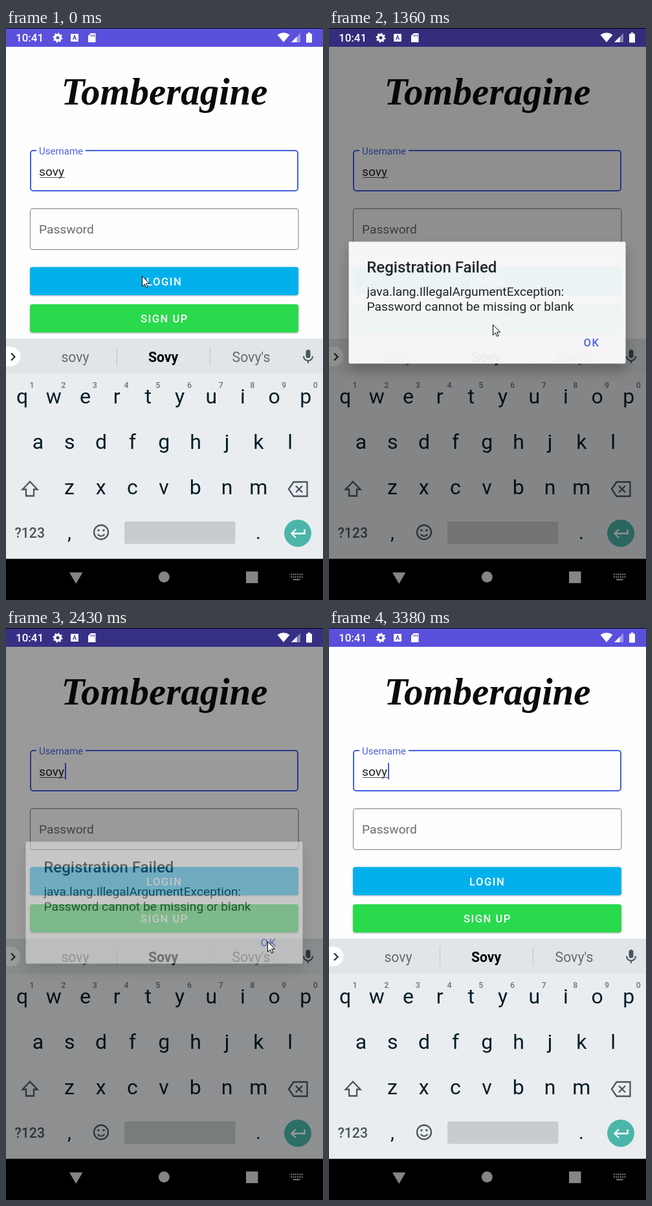
Recreate the animation shown at these times as an HTML page. Size 490 by 882 pixels, loop 3750 ms.

```html
<!DOCTYPE html>
<html lang="en">
<head>
<meta charset="utf-8">
<title>Sign-up error dialog</title>
<style>
  html, body { margin: 0; width: 100%; height: 100%; overflow: hidden; background: #000; }
  svg { display: block; font-family: Roboto, sans-serif; font-size: 19.2px; }
  .mid { text-anchor: middle; }
  .medium { font-weight: 500; }
  .caps { font-weight: 500; font-size: 16.6px; letter-spacing: 1.5px; }
  .key { font-size: 32px; fill: #031e28; text-anchor: middle; }
  .digit { font-size: 12.5px; font-weight: 500; fill: #6b7479; text-anchor: middle; }
  .hint { font-size: 21.2px; text-anchor: middle; fill: #636b70; }
  .line { fill: none; stroke: #48575e; stroke-width: 2.3; }
  .button { filter: drop-shadow(0 1.5px 1px rgba(0,0,0,.32)); }
  .panel { fill: #fff; filter: drop-shadow(0 10px 10px rgba(0,0,0,.26)); }
</style>
</head>
<body>
<svg width="490" height="882" viewBox="0 0 490 882">
  <defs>
    <clipPath id="signUpClip"><rect x="37" y="426" width="415" height="43.5" rx="4"/></clipPath>
  </defs>

  <!-- Page -->
  <rect y="1" width="490" height="818" fill="#fefefe"/>
  <rect y="1" width="490" height="28" fill="#5a50dc"/>

  <text class="mid" x="245" y="118" fill="#0a0a0a"
    style="font:italic 700 59px 'Liberation Serif',serif">Tomberagine</text>

  <rect x="38" y="189" width="413" height="62" rx="4" fill="none" stroke="#4260e2" stroke-width="2"/>
  <path d="M47 189H123" stroke="#fefefe" stroke-width="4"/>
  <text x="51" y="195" font-size="15" fill="#4a62e0">Username</text>
  <text x="51" y="228" fill="#202020">sovy</text>
  <path d="M52 230.500H91" stroke="#555"/>
  <rect id="caret" x="91" y="208" width="2" height="25.500" fill="#4260e2"/>

  <rect x="37.500" y="278.700" width="414.500" height="63" rx="4" fill="none" stroke="#8e8e8e" stroke-width="1.200"/>
  <text x="51" y="317" fill="#6b6b6b">Password</text>

  <rect class="button" x="37" y="368.500" width="415" height="43.500" rx="4" fill="#02b1ec"/>
  <rect class="button" id="signUp" x="37" y="426" width="415" height="43.500" rx="4" fill="#29da4d"/>
  <circle id="ripple" cx="253" cy="457" fill="#fff" fill-opacity=".235" clip-path="url(#signUpClip)"/>
  <g class="caps" fill="#fff">
    <text x="217" y="397">LOGIN</text>
    <text x="208" y="454">SIGN UP</text>
  </g>

  <!-- Keyboard -->
  <rect y="479" width="490" height="340" fill="#eaedf0"/>
  <rect y="479" width="490" height="54" fill="#e1e5e8"/>
  <rect x="-20" y="491.500" width="42.500" height="30" rx="15" fill="#fff"/>
  <path d="M8 501.500L13.500 507L8 512.500" fill="none" stroke="#2a3439" stroke-width="2.200"/>
  <text class="hint" x="107" y="515">sovy</text>
  <text class="hint" x="243" y="515" style="font-weight:700;fill:#000">Sovy</text>
  <text class="hint" x="379" y="515">Sovy's</text>
  <path d="M171.500 492V521M315.500 492V521" stroke="#c0c5c8"/>
  <rect x="463.500" y="496" width="7" height="13" rx="3.500" fill="#48575e"/>
  <path d="M460 506a7 7 0 0 0 14 0M467 513v4" class="line" style="stroke-width:2"/>
  <g id="keys"></g>

  <path class="line" d="M37 699.500L25.500 711.500H31V721.500H43V711.500H48.500z"/>
  <path class="line" d="M437 711L444.500 700H465.500V722H444.500zM448 706l10 10M458 706l-10 10"/>
  <text class="medium" x="13.500" y="786" font-size="21.200" fill="#46555b">?123</text>
  <text class="key" x="98" y="788" style="font-size:30px">,</text>
  <text class="key" x="390" y="788" style="font-size:30px">.</text>
  <circle class="line" cx="147" cy="777.500" r="11"/>
  <path class="line" d="M141.500 780.500Q147 786.500 152.500 780.500" style="stroke-width:2"/>
  <g fill="#48575e">
    <circle cx="143" cy="774.500" r="1.700"/>
    <circle cx="151" cy="774.500" r="1.700"/>
  </g>
  <rect x="183" y="761" width="171.500" height="34.500" rx="3" fill="#c8cccf"/>
  <circle cx="451" cy="779" r="21" fill="#4bb5a9"/>
  <path d="M461.500 773V779.500H442M448 773L441.500 779.500L448 786" fill="none" stroke="#fff" stroke-width="2.300"/>

  <!-- The dim layer leaves the status icons bright -->
  <rect id="dim" y="1" width="490" height="818"/>
  <g fill="#fff">
    <text class="medium" x="15" y="21.3" font-size="17">10:41</text>
    <g fill="none" stroke="#fff">
      <circle cx="80" cy="15" r="4.2" stroke-width="3.4"/>
      <circle cx="80" cy="15" r="6.3" stroke-width="2.4" pathLength="16" stroke-dasharray="1"/>
    </g>
    <rect x="100" y="9" width="12" height="12" rx="1"/>
    <text class="mid" x="106" y="18.3" font-size="9" font-weight="700" fill="#4038a0">A</text>
    <path d="M131 8H138.500V22H127V12z"/>
    <path d="M131.500 10v3.500M134 10v3.500M136.500 10v3.500" stroke="#4038a0"/>
    <path d="M429 22L419.500 10.500Q429 4 438.500 10.500z"/>
    <path d="M441 22L455 8V22z" opacity=".4"/>
    <path d="M441 22L449.500 13.500V22z"/>
    <path d="M464 9h2.500V7h4v2H473V22.500H464z"/>
  </g>

  <!-- Dialog -->
  <g id="dialog" fill="#212121">
    <rect class="panel" x="30.500" y="329.500" width="428" height="188" rx="2"/>
    <text class="medium" x="58.300" y="376.500" font-size="24.050">Registration Failed</text>
    <g font-size="19.240">
      <text x="58.400" y="413">java.lang.IllegalArgumentException:</text>
      <text x="58.400" y="435.500">Password cannot be missing or blank</text>
    </g>
    <text class="caps" x="393.500" y="490.500" fill="#4a60e4">OK</text>
  </g>

  <!-- Navigation bar -->
  <rect y="818.500" width="490" height="64"/>
  <g fill="#858585">
    <path d="M98 839.500H118.500L108.200 857z"/>
    <circle cx="244.300" cy="846.500" r="8.500"/>
    <rect x="371" y="838" width="18.500" height="18"/>
    <g stroke="#858585" stroke-width="1.800">
      <path d="M440 842.500H458.500M440 846.500H458.500" stroke-dasharray="2 1.300"/>
      <path d="M444 850.500H454.500"/>
    </g>
  </g>

  <path id="pointer" d="M.5 .5V16.500L4.300 13L6.700 18.500L9 17.500L6.600 12H11.500z" fill="#fff" stroke="#000"/>
</svg>
<script>
const LOOP = 3750;
const byId = id => document.getElementById(id);
const [caret, signUp, ripple, keys, dim, dialog, pointer] =
  ["caret", "signUp", "ripple", "keys", "dim", "dialog", "pointer"].map(byId);

const KEY_STEP = 48.7;
function addRow(chars, x, y, className) {
  [...chars].forEach((char, i) => {
    keys.innerHTML += `<text class="${className}" x="${x + i * KEY_STEP}" y="${y}">${char}</text>`;
  });
}
addRow("1234567890", 40, 555, "digit");
addRow("qwertyuiop", 25, 579, "key");
addRow("asdfghjkl", 49.5, 649, "key");
addRow("zxcvbnm", 98, 719, "key");

const progress = (t, from, to) => Math.min(1, Math.max(0, (t - from) / (to - from)));
const smooth = p => p * p * (3 - 2 * p);
const between = (t, from, to) => t >= from && t < to;

// Pointer moves: start, end, x, y
const moves = [
  [50, 95, 218, 382],
  [250, 460, 280, 431],
  [590, 880, 253, 457],
  [1700, 2130, 404, 483],
  [2659, 2660, 403, 482],
  [2820, 3360, 410, 871],
];

function pointerAt(t) {
  let x = 210, y = 382;
  for (const [from, to, nextX, nextY] of moves) {
    const p = smooth(progress(t, from, to));
    x += (nextX - x) * p;
    y += (nextY - y) * p;
  }
  return [Math.round(x), Math.round(y)];
}

function show(element, visible) {
  element.style.visibility = visible ? "visible" : "hidden";
}

function draw(t) {
  pointer.setAttribute("transform", `translate(${pointerAt(t)})`);
  show(pointer, t < 3380);
  show(caret, between(t, 360, 860) || between(t, 2400, 2880) || t >= 3360);

  const press = t < 1400 ? progress(t, 1120, 1260) : 0;
  ripple.setAttribute("r", 225 * press);
  signUp.style.filter = press
    ? `drop-shadow(0 ${1.5 + 4.5 * press}px ${1 + 4 * press}px rgba(0,0,0,.32))` : "";

  const enter = progress(t, 1288, 1388);
  const leave = progress(t, 2398, 2495);
  dim.setAttribute("opacity", 0.6 * (enter - leave));
  dialog.setAttribute("opacity", (1 - (1 - enter) ** 2) * (1 - leave) ** 2);
}

const start = performance.now();
function tick() {
  draw((performance.now() - start) % LOOP);
  requestAnimationFrame(tick);
}
tick();
</script>
</body>
</html>
```
